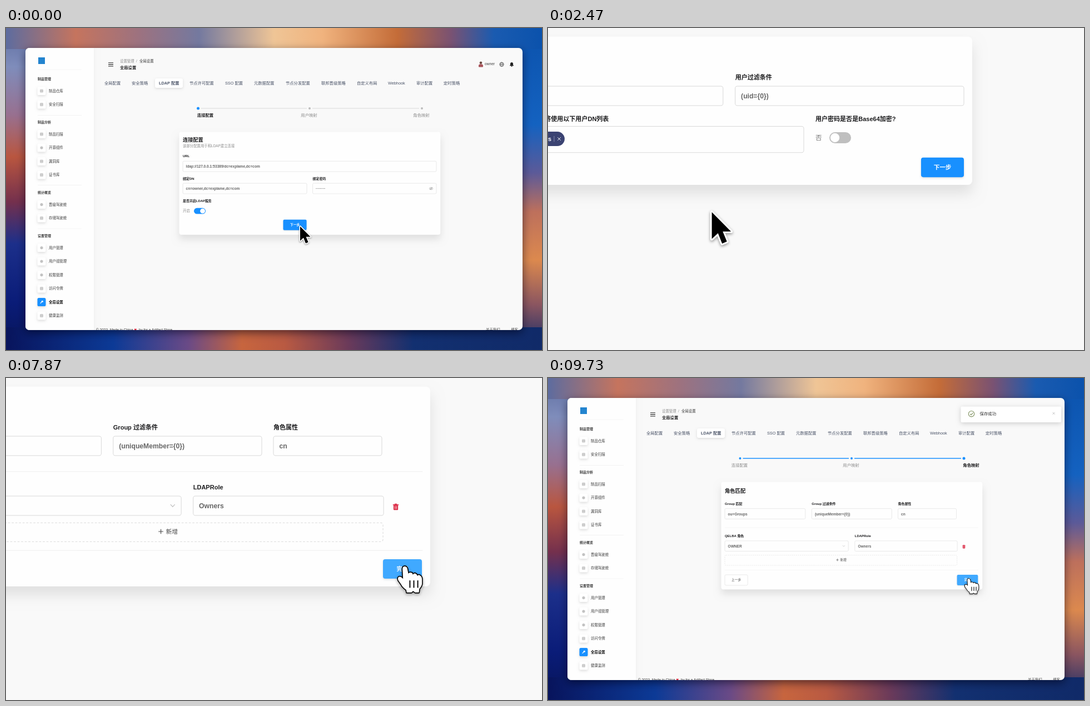
An HTML page with a canvas for the animation above (9.79 s loop, 964 by 581 pixels).

```html
<!DOCTYPE html>
<html lang="zh">
<head>
<meta charset="utf-8">
<title>LDAP 配置</title>
<style>
html, body { margin: 0; width: 100%; height: 100%; overflow: hidden; background: #f9f9f9; }
canvas { display: block; }
</style>
</head>
<body>
<canvas id="stage" width="964" height="581"></canvas>
<script>
const W = 964, H = 581, LOOP = 9790, FPS = 15;
const ZOOM = 1.857, FOCUS = { x: 802.8, y: 388 };
const BLUE = '#1890ff', HOVER = '#40a9ff', DARK = '#1c1c1e', GREY = '#8c8c8c', LINE = '#d9d9d9';
const FONT = '"Liberation Sans", "Noto Sans CJK SC", "Noto Sans CJK", sans-serif';

const out = document.getElementById('stage').getContext('2d');
const layer = document.createElement('canvas');
layer.width = W;
layer.height = H;
const c = layer.getContext('2d');

const clamp = v => Math.max(0, Math.min(1, v));
const span = (t, from, to) => clamp((t - from) / (to - from));
const mix = (a, b, p) => a + (b - a) * p;
const ease = u => u < .5 ? 4 * u ** 3 : 1 - 4 * (1 - u) ** 3;

// ---- drawing helpers ----
function text(s, x, y, size, color = DARK, weight = 400, align = 'left') {
  c.font = `${weight} ${size}px ${FONT}`;
  c.fillStyle = color;
  c.textAlign = align;
  c.fillText(s, x, y + size * .365);
}

function box(x, y, r, b, radius, fill, stroke, width = .55) {
  c.beginPath();
  c.roundRect(x, y, r - x, b - y, radius);
  if (fill) { c.fillStyle = fill; c.fill(); }
  if (stroke) { c.strokeStyle = stroke; c.lineWidth = width; c.stroke(); }
}

function shadowed(color, blur, dy, draw) {
  c.save();
  const k = c.getTransform().a;
  c.shadowColor = color;
  c.shadowBlur = blur * k;
  c.shadowOffsetY = dy * k;
  draw();
  c.restore();
}

function dot(x, y, r, color) {
  c.beginPath();
  c.arc(x, y, r, 0, 7);
  c.fillStyle = color;
  c.fill();
}

function lines(color, width, ...paths) {
  c.strokeStyle = color;
  c.lineWidth = width;
  c.beginPath();
  for (const p of paths)
    for (let i = 0; i < p.length; i += 2) i ? c.lineTo(p[i], p[i + 1]) : c.moveTo(p[i], p[i + 1]);
  c.stroke();
}

const cross = (x, y, r, color) =>
  lines(color, .5, [x - r, y - r, x + r, y + r], [x + r, y - r, x - r, y + r]);

function label(s, x, y) { text(s, x, y, 5.95, DARK, 700); }

function input(s, x, y, r, b = y + 18.8) {
  box(x, y, r, b, 2, '#fefefe', LINE);
  text(s, x + 5.6, (y + b) / 2 + .2, 6.55, '#666', 700);
}

function button(s, x, y, r, b, fill) {
  shadowed('rgba(0,0,0,.12)', 2, 1, () => box(x, y, r, b, 2.2, fill));
  text(s, (x + r) / 2, (y + b) / 2 - .3, 5.7, '#fff', 700, 'center');
}

function toggle(x, y, on) {
  box(x, y, x + 21, y + 10.8, 5.4, on ? BLUE : '#bfbfbf');
  dot(on ? x + 15.6 : x + 5.4, y + 5.4, 4.4, '#fff');
}

function card(bottom) {
  shadowed('rgba(0,0,0,.10)', 13, 8, () => box(311.5, 187.5, 781.3, bottom, 4, '#fefefe'));
}

function strip(x, y, w, h, vertical, stops) {
  const g = vertical ? c.createLinearGradient(0, 0, 0, H) : c.createLinearGradient(0, 0, W, 0);
  stops.forEach(([at, color]) => g.addColorStop(at, color));
  c.fillStyle = g;
  c.fillRect(x, y, w, h);
}

// ---- page parts ----
function backdrop() {
  strip(0, 0, 480, H, true, [[0, '#5d6c9f'], [.12, '#7f8dbb'], [.27, '#98708f'], [.4, '#b9563f'],
    [.54, '#74304d'], [.67, '#1c2f8a'], [.85, '#0a1c78'], [1, '#071457']]);
  strip(480, 0, 484, H, true, [[0, '#0b52ac'], [.3, '#1462c0'], [.45, '#5c5a98'], [.57, '#bd705c'],
    [.72, '#dc894e'], [.86, '#8a5560'], [1, '#102a68']]);
  strip(0, 0, W, 38, false, [[0, '#5d6c9f'], [.13, '#c5745e'], [.25, '#9c7280'], [.36, '#74799f'],
    [.5, '#efc596'], [.59, '#f0b37e'], [.73, '#c46c38'], [.83, '#7a5272'], [.91, '#1a5bb0'], [1, '#0b52ac']]);
  strip(0, 540, W, 41, false, [[0, '#08145c'], [.2, '#0c3a96'], [.34, '#6a4a86'], [.44, '#c7653e'],
    [.52, '#b95a42'], [.64, '#6a3a5a'], [.76, '#123070'], [1, '#102a68']]);
}

const MENU = [
  ['制品管理', 92, ['制品仓库', '安全扫描']],
  ['制品分析', 170, ['制品扫描', '开源组件', '漏洞库', '证书库']],
  ['统计概览', 297, ['晋级驾驶舱', '存储驾驶舱']],
  ['设置管理', 375, ['用户管理', '用户组管理', '权限管理', '访问令牌', '全局设置', '健康监测']],
];

function menuIcon(x, y, kind, active) {
  shadowed('rgba(0,0,0,.13)', 4, 2, () => box(x - 7.5, y - 7.5, x + 7.5, y + 7.5, 2.6, active ? BLUE : '#fff'));
  if (active) {
    lines('#fff', 1.3, [x - 2.3, y + 2.3, x + .7, y - .7]);
    dot(x + 1.3, y - 1.3, 1.6, '#fff');
    return;
  }
  if (kind % 3 == 2) return dot(x, y, 2.6, '#c2c2c2');
  box(x - 2.5, y - 2.5, x + 2.5, y + 2.5, .6, '#d5d5d5', '#b5b5b5', .6);
  lines('#aaa', .5, [x - 2, y, x + 2, y]);
}

function sidebar() {
  shadowed('rgba(0,0,0,.05)', 8, 0, () => { c.fillStyle = '#fefefe'; c.fillRect(35, 36, 123, 509); });
  box(58, 53, 70, 65, 0, '#2384cf');
  [75, 157.5, 283.5, 362].forEach(y => lines('#f0f0f0', .7, [57, y, 136, y]));
  MENU.forEach(([head, top, items], g) => {
    text(head, 57, top, 6, '#333', 700);
    items.forEach((s, i) => {
      const y = top + 21.6 + i * 24.5, active = s == '全局设置';
      menuIcon(64, y, g + i * (g == 3 ? 0 : 1) + (g == 3 && i < 3 ? 2 : 0), active);
      text(s, 77, y, 6.45, active ? '#111' : '#3a3a3a', active ? 700 : 500);
    });
  });
}

function header() {
  [62.8, 65.9, 69].forEach(y => lines('#222', 1.1, [184, y, 193, y]));
  text('设置管理', 205, 59.5, 6.4, GREY);
  text('/', 234, 59.5, 6.4, GREY);
  text('全局设置', 240, 59.5, 6.4, '#333', 500);
  text('全局设置', 205, 71, 7.3, DARK, 700);

  dot(854, 62.8, 2.3, '#6b4a42');
  box(850, 65.3, 858, 70.5, [3, 3, 1, 1], '#a8545a');
  text('owner', 861, 64.8, 6.7, '#444', 500);
  c.beginPath();
  c.arc(891.5, 65.7, 3.7, 0, 7);
  c.moveTo(893.2, 65.7);
  c.ellipse(891.5, 65.7, 1.7, 3.7, 0, 0, 7);
  c.strokeStyle = '#333';
  c.lineWidth = .7;
  c.stroke();
  lines('#333', .6, [887.8, 65.7, 895.2, 65.7]);
  box(907, 62, 912, 68, [2.5, 2.5, 0, 0], '#222');
  box(906, 67, 913, 68.3, .5, '#222');
  dot(909.5, 69, 1, '#222');

  shadowed('rgba(0,0,0,.12)', 4, 1.5, () => box(268, 91, 318, 108, 3, '#fff'));
  const tabs = { 全局配置: 177, 安全策略: 226, 'LDAP 配置': 275, 节点许可配置: 330, 'SSO 配置': 394,
    元数据配置: 446, 节点分发配置: 503, 联邦晋级策略: 567, 自定义布局: 631, Webhook: 687, 审计配置: 738, 定时策略: 787 };
  for (const s in tabs) text(s, tabs[s], 99.8, 7.3, '#4b5468', s[0] == 'L' ? 700 : 500);
}

function footer() {
  text('© 2023, Made in China', 162, 544.6, 6.5, '#444', 500);
  text('♥', 230.5, 544.4, 8, '#e0243a');
  text('by for a Artifact Store', 239, 544.6, 6.4, '#444', 500);
  text('关于我们', 863, 544.6, 6.4, '#444');
  text('博客', 908, 544.6, 6.4, '#444');
}

function steps(page) {
  const xs = [345.5, 546, 748], names = ['连接配置', '用户映射', '角色映射'];
  xs.forEach((x, i) => {
    const on = i == page, done = i < page;
    if (i < 2) lines(done ? BLUE : '#e9e9e9', done ? 1.7 : 2.2, [x + 5, 145, xs[i + 1] - 5, 145]);
    dot(x, 145, on ? 2.5 : 2, on || done ? BLUE : '#bdbdbd');
    text(names[i], x + (on ? 13 : -1), 157, 7.35, on ? DARK : GREY, on ? 700 : 400, 'center');
  });
}

function connectPage() {
  card(373);
  text('连接配置', 318, 201.5, 9.2, DARK, 700);
  text('该部分配置用于和LDAP建立连接', 318, 213, 6.4, GREY);
  label('URL', 318, 231.3);
  input('ldap://127.0.0.1:53389/dc=explame,dc=com', 318, 240.3, 774);
  label('绑定DN', 318, 271.5);
  input('cn=owner,dc=explame,dc=com', 318, 280.2, 541);
  label('绑定密码', 551.5, 271.5);
  input('········', 551.5, 280.2, 774);
  c.beginPath();
  c.ellipse(764.5, 289.7, 3, 2, 0, 0, 7);
  c.strokeStyle = GREY;
  c.lineWidth = .6;
  c.stroke();
  dot(764.5, 289.7, .9, GREY);
  lines(GREY, .6, [762.3, 292, 766.7, 287.3]);
  label('是否开启LDAP服务', 318, 312);
  text('开启', 318, 330, 6.4, GREY);
  toggle(338, 324.8, true);
  button('下一步', 498.5, 345.8, 540.6, 364.8, BLUE);
}

function userPage(hover) {
  card(331.4);
  text('用户匹配', 318, 204, 9.2, DARK, 700);
  label('用户匹配', 318, 227);
  input('ou=Users', 318, 235.6, 540);
  label('用户过滤条件', 551.8, 227);
  input('(uid={0})', 551.8, 235.6, 773.3);
  text('将使用以下用户DN列表', 429.4, 267.4, 5.95, DARK, 700, 'right');
  box(318, 274.6, 618.2, 300.1, 2, '#fefefe', LINE);
  box(345, 279.8, 386.6, 293.8, 7, '#3b4372');
  text('Users', 373.7, 287, 5.6, '#fff', 700, 'right');
  lines('#8a90b5', .5, [376.4, 284, 376.4, 289.6]);
  cross(381.3, 286.8, 1.5, '#fff');
  label('用户密码是否是Base64加密?', 629.5, 267.4);
  text('否', 629.5, 285.7, 6.2, '#777');
  toggle(643, 280.3, false);
  button('下一步', 731.8, 305, 773.3, 324, hover ? HOVER : BLUE);
}

function rolePage(hover) {
  card(381.5);
  text('角色匹配', 318, 204, 9.3, DARK, 700);
  label('Group 匹配', 318, 227);
  input('ou=Groups', 318, 235.6, 462.8);
  label('Group 过滤条件', 474.3, 227);
  input('(uniqueMember={0})', 474.3, 235.6, 618.2);
  label('角色属性', 629.5, 227);
  input('cn', 629.5, 235.6, 734.5);
  lines('#ececec', .5, [318, 270, 774, 270], [318, 346.6, 774, 346.6]);
  label('QELBA 角色', 318, 285.3);
  input('OWNER', 318, 293.8, 540.2);
  lines('#bbb', .6, [529.8, 301.9, 531.9, 304.2, 534, 301.9]);
  label('LDAPRole', 551.8, 285.3);
  input('Owners', 551.8, 293.8, 736.2);

  const red = '#dc2f49';
  box(745.8, 302.5, 750.2, 307.4, .6, red);
  lines(red, .8, [745.2, 302.2, 750.8, 302.2], [746.8, 301.5, 749.2, 301.5]);
  lines('#fff', .45, [747.3, 303.6, 747.3, 306.3], [748.7, 303.6, 748.7, 306.3]);

  c.setLineDash([2, 1.5]);
  box(318, 319.7, 735.6, 338, 2, null, LINE);
  c.setLineDash([]);
  lines('#444', .6, [518.2, 328.2, 522.8, 328.2], [520.5, 325.9, 520.5, 330.5]);
  text('新增', 525.5, 328.3, 5.7, '#444', 500);
  box(318, 355.1, 359.2, 374, 2.2, '#fff', LINE);
  text('上一步', 338.6, 364.4, 5.7, '#444', 500, 'center');
  button('完成', 735.6, 355.1, 773.3, 374, hover ? HOVER : BLUE);
}

function notice(t) {
  const u = span(t, 8.7, 8.95);
  if (!u) return;
  const p = 1 - (1 - u) ** 2;
  c.save();
  c.globalAlpha = p;
  c.translate(180 * (1 - p), 0);
  shadowed('rgba(0,0,0,.18)', 8, 2, () => box(742.5, 51.5, 923, 80, 2, '#fff'));
  c.beginPath();
  c.arc(761.5, 64.7, 5.2, 0, 7);
  c.strokeStyle = '#7d8f5c';
  c.lineWidth = 1.1;
  c.stroke();
  lines('#7d8f5c', 1.1, [759, 64.8, 760.9, 66.7, 764.2, 62.8]);
  text('保存成功', 776.5, 64.6, 7.4, '#333', 500);
  cross(909.5, 63.8, 2, '#888');
  c.restore();
}

// ---- motion ----
const cameraAt = t => ease(span(t, 1, 1.934)) - ease(span(t, 7.98, 8.915));

function pointerAt(t) {
  const a = ease(span(t, 2.4, 3.6)), b = ease(span(t, 5.2, 6.5));
  const press = [1.5, 4.05, 8].reduce((s, at) => s + clamp(1 - Math.abs(t - at) / .2), 0);
  return {
    x: mix(mix(529, 739.9, a), 757.1, b),
    y: mix(mix(358, 317.4, a), 362.1, b),
    hand: t > 3.2,
    size: 1 - .17 * press,
  };
}

function aim(g, p) {
  const s = mix(1, ZOOM, p);
  g.setTransform(s, 0, 0, s, FOCUS.x * (1 - s), FOCUS.y * (1 - s));
}

function scene(t, p) {
  aim(c, p);
  backdrop();
  shadowed('rgba(0,0,20,.55)', 16, 5, () => box(35, 36, 929, 545, 7, '#f9f9f9'));
  c.save();
  c.beginPath();
  c.roundRect(35, 36, 894, 509, 7);
  c.clip();
  const page = t < 2.05 ? 0 : t < 4.25 ? 1 : 2;
  const m = pointerAt(t);
  sidebar();
  header();
  footer();
  steps(page);
  if (page == 0) connectPage();
  else if (page == 1) userPage(m.x > 731.8 && m.y < 324);
  else rolePage(m.y > 355.1);
  notice(t);
  c.restore();
}

const ARROW = new Path2D('M0 0V26L6 20.5 10 30.5 14.6 28.5 10.6 18.8H18.6Z');
const HAND = new Path2D('M-4 24 -5 5Q-5 0 -1 0 3 0 4 4L6 14Q8 11 11 12 14 12 14.5 16 17 12 20 14 22.5 15 23 18 ' +
  '26 15 29 18 32 20 32 25V33Q32 37 27 43L26 50H19L15 47 12 50H3L2 45Q-5 40 -8 34L-13 27Q-15 22 -12 20 -8 19 -4 24Z');

function pointer(t, p) {
  const m = pointerAt(t);
  out.save();
  aim(out, p);
  out.translate(m.x, m.y);
  out.scale(m.size, m.size);
  const k = out.getTransform().a;
  out.shadowColor = 'rgba(0,0,0,.4)';
  out.shadowBlur = 3 * k;
  out.shadowOffsetY = 1.2 * k;
  out.lineJoin = 'round';
  if (m.hand) {
    out.scale(1 / ZOOM, 1 / ZOOM);
    out.lineWidth = 3.4;
    out.strokeStyle = '#000';
    out.stroke(HAND);
    out.shadowColor = 'transparent';
    out.fillStyle = '#fff';
    out.fill(HAND);
    out.lineWidth = 2;
    out.beginPath();
    for (const x of [9, 16.5, 24]) { out.moveTo(x, 27); out.lineTo(x, 41); }
    out.stroke();
  } else {
    out.lineWidth = 3.2;
    out.strokeStyle = '#fff';
    out.stroke(ARROW);
    out.shadowColor = 'transparent';
    out.fillStyle = '#000';
    out.fill(ARROW);
  }
  out.restore();
}

// Averages several camera positions while the view is moving fast.
function render(t) {
  const shutter = .01;
  const moving = Math.abs(cameraAt(t + shutter) - cameraAt(t - shutter)) > .004;
  const n = moving ? 8 : 1;
  for (let i = 0; i < n; i++) {
    scene(t, cameraAt(t + shutter * ((i + .5) / n - .5)));
    out.globalAlpha = 1 / (i + 1);
    out.drawImage(layer, 0, 0);
  }
  out.globalAlpha = 1;
  pointer(t, cameraAt(t));
}

let shown = -1;
const start = performance.now();
function tick() {
  const ms = (performance.now() - start) % LOOP;
  const step = Math.floor((ms + 5) * FPS / 1000) % 147;
  if (step != shown) {
    shown = step;
    render(step / FPS);
  }
  requestAnimationFrame(tick);
}
tick();
</script>
</body>
</html>
```
